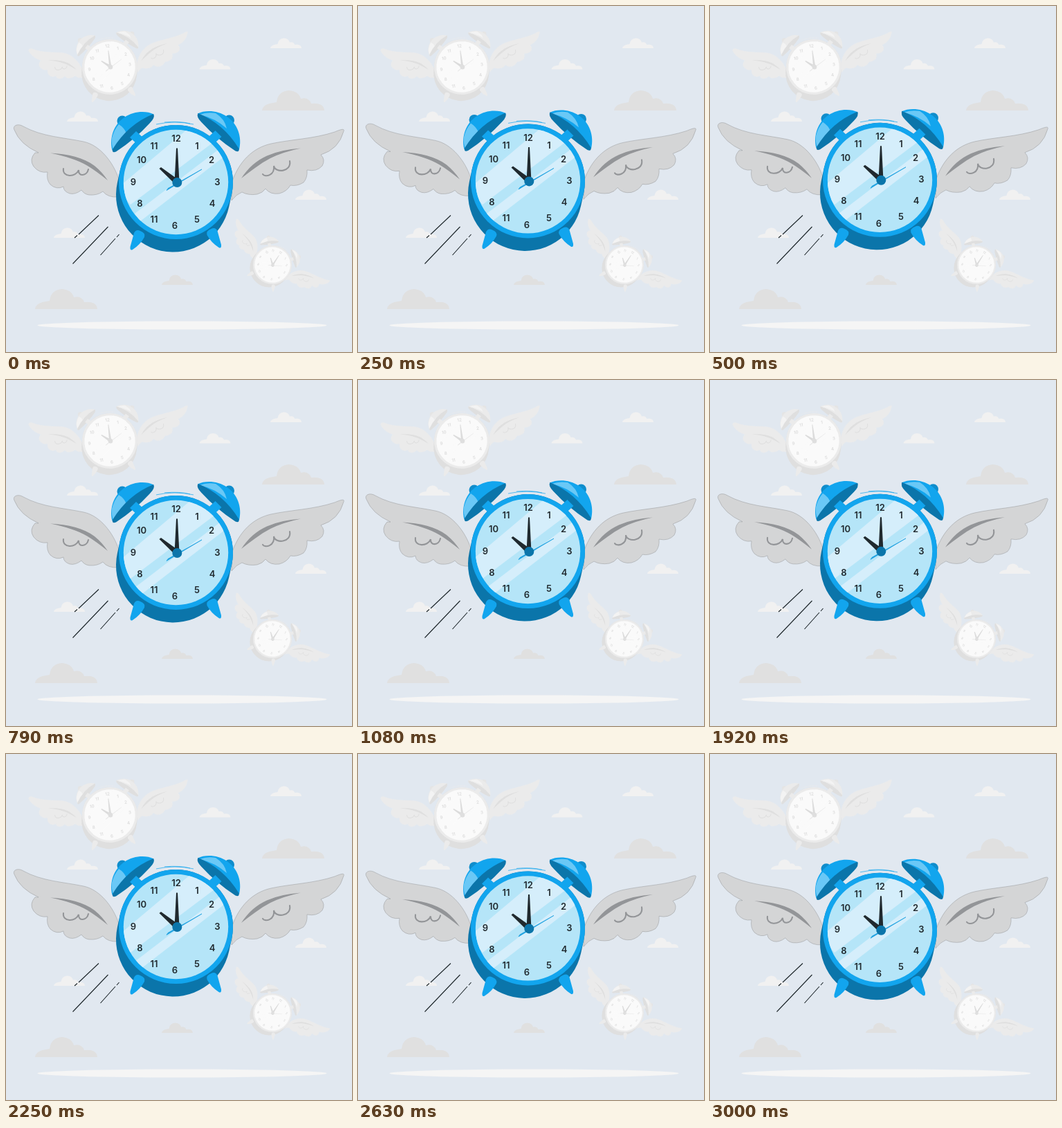
Recreate the animation shown at these times as an HTML page. Size 500x500 px, loop 3040 ms.

```html
<!DOCTYPE html>
<html lang="en">
<head>
<meta charset="utf-8">
<title>Flying alarm clock</title>
<style>
html, body { margin: 0; width: 100%; height: 100%; overflow: hidden; background: #e1e8f0; }
svg { display: block; width: 100%; height: 100%; }
.main {
  --rim: #12a5ee; --body: #0b75aa; --shine: #6ac8f6; --face: #b5e5f8; --glass: #d5eefb;
  --ink: #20292e; --sweep: #1a9fe0; --wing: #d4d5d6; --edge: #8e9092; --fold: #939598;
}
.pale {
  --rim: #ebebeb; --body: #dfdfdf; --shine: #f3f3f3; --face: #fafafa; --glass: #fafafa;
  --ink: #dcdcdc; --sweep: #e6e6e6; --wing: #ebebeb; --edge: #ebebeb; --fold: #dfdfdf;
}
.rim { fill: var(--rim); }
.body { fill: var(--body); }
.knob { fill: color-mix(in srgb, var(--rim), var(--body)); }
.shine { fill: var(--shine); }
.ink { fill: var(--ink); }
.wing { fill: var(--wing); stroke: var(--edge); stroke-width: .45; }
.fold { fill: var(--fold); }
.curl { fill: none; stroke: var(--fold); stroke-width: 2.1; stroke-linecap: round; }
#digits { fill: var(--ink); font: 600 13px Inter, "Open Sans", sans-serif; text-anchor: middle; }
.ground { fill: #f5f5f5; }
.light { fill: #f1f1f1; }
.dark { fill: #e0e0e0; }
</style>
</head>
<body>
<svg viewBox="0 0 500 500">
  <defs>
    <clipPath id="dial"><circle cx="245.500" cy="254.500" r="75.700"/></clipPath>
    <path id="cloud" d="M0 29Q1 20 16 18L21 17Q23 1 39 0Q53 1 56 12Q67 9 71 19Q89 17 90 29Z"/>
    <g id="dome">
      <circle class="knob" cx="168" cy="166" r="7.500"/>
      <path class="rim" d="M213.500 156.500C202 151 184 152 171 161C156 171 149 190 153.500 208.500L158 210L213 161Z"/>
    </g>
    <g id="mouth">
      <path class="body" d="M213 156Q216 161 208 169Q186 193 159 210.500Q153 213 154 207Q176 171 213 156Z"/>
      <path class="rim" d="M179 190L188 181L200 192L191 201Z"/>
    </g>
    <path id="foot" class="rim" d="M185 328Q188 322 194 325Q202 328 200 334Q194 345 183 352Q179 354 179.500 348Z"/>

    <g id="clock">
      <path class="wing" d="M12 179C9 173 17 169 25 174C52 189 84 190 112 196C136 201 155 226 163 250L162 276Q147 277 140 268Q132 274 120 273Q113 272 109 266Q100 273 92 271Q83 268 83 261Q73 266 64 258Q58 251 60 240Q48 242 40 232Q33 222 42 212H47Q20 200 12 179Z"/>
      <path class="fold" d="M64 212.500C90 214 112 219 128 231Q139 240 147 252Q131 239 118 231C104 223 87 217 64 212.500Z"/>
      <path class="curl" d="M83 235C81 248 101 248 105 237C104 247 117 246 119 236"/>
      <path class="wing" d="M488 181C490 176 482 179 475 182C445 192 410 193 383 199C356 205 337 225 327 253L326 281Q333 272 341 269Q350 274 363 272Q371 270 375 264Q382 273 395 271Q406 268 411 259Q420 261 430 255Q436 248 435 237Q449 240 457 231Q462 222 455 215Q481 207 488 181Z"/>
      <path class="fold" d="M340 249C350 234 362 223 377 216.500Q397 207.500 426 205.500Q400 211 382 220C367 228 354 238 340 249Z"/>
      <path class="curl" d="M410 224C413 240 389 242 387 231C389 245 374 248 371 243"/>

      <path d="M245.500 254.500L241.500 273" fill="none" stroke="var(--body)" stroke-width="165" stroke-linecap="round"/>
      <use href="#dome"/>
      <path class="shine" d="M153 191Q156 179 163 171Q171 176 174 184Q163 195 155 208Q152 199 153 191Z"/>
      <use href="#mouth"/>
      <g transform="translate(0 -1)">
        <use href="#dome" transform="matrix(-1 0 0 1 490.500 0)"/>
        <path class="shine" d="M280 158Q290 154 303 156Q316 164 319 178Q302 163 280 158Z"/>
        <use href="#mouth" transform="matrix(-1 0 0 1 490.500 0)"/>
      </g>
      <use href="#foot"/>
      <use href="#foot" transform="matrix(-1 0 0 1 490.500 -3)"/>
      <circle class="rim" cx="245.500" cy="254.500" r="82.500"/>
      <path d="M217 171Q244 165 271 171M229 168Q251 166 266 170" fill="none" stroke="var(--rim)" stroke-width=".7"/>
      <circle cx="245.500" cy="254.500" r="75.700" fill="var(--face)"/>
      <g clip-path="url(#dial)">
        <path id="glass" fill="var(--glass)" d="M160 264L280 163L322 180L180 287ZM186 300L322 196L330 206L194 311Z"/>
      </g>
      <g id="digits"></g>
      <path d="M232 266.500L283 236L234 263.500Z" fill="var(--sweep)" stroke="var(--sweep)" stroke-width=".7"/>
      <path class="ink" d="M246 205.500H248L250.500 255H243.500ZM221.500 235L224 233L249 251L244 257Z"/>
      <circle class="body" cx="247.300" cy="255" r="7"/>
    </g>
  </defs>

  <ellipse class="ground" cx="254.500" cy="461.500" rx="209" ry="6"/>
  <g id="sky"></g>
  <g class="pale">
    <use href="#clock" transform="translate(150 88) rotate(-7) scale(.485) translate(-245.500 -254.500)"/>
    <use href="#clock" transform="translate(385 374) rotate(33) scale(.34) translate(-245.500 -254.500)"/>
  </g>
  <path d="M134 302.500L105 330M103 331.500L99 335M147.500 319L96.500 372.500M163.500 330L160 334M158 336L136.500 360" stroke="#1c2529" stroke-width="1.100"/>
  <g id="flyer" class="main"><use href="#clock"/></g>
</svg>
<script>
const byId = id => document.getElementById(id);

// x, y, scale, tone
const clouds = [
  [382, 46.5, .5, 'light'], [279.5, 77, .5, 'light'], [88, 152.5, .5, 'light'],
  [418, 265.5, .5, 'light'], [69, 320.5, .5, 'light'],
  [370, 122, 1, 'dark'], [42, 409, 1, 'dark'], [225, 388.5, .5, 'dark']
];
byId('sky').innerHTML = clouds.map(([x, y, s, tone]) =>
  `<use href="#cloud" class="${tone}" transform="translate(${x} ${y}) scale(${s})"/>`).join('');

// label, centre x, centre y
const digits = [
  [12, 246, 191.5], [1, 276, 202.5], [2, 297, 222.5], [3, 305.5, 254], [4, 298, 285], [5, 276, 308],
  [6, 244, 317.5], [11, 214, 308], [8, 193.5, 285], [9, 184, 254], [10, 196, 222.5], [11, 214, 202.5]
];
byId('digits').innerHTML = digits.map(([label, x, y]) =>
  `<text x="${x}" y="${y + 4.7}">${label}</text>`).join('');

const LOOP = 3040, RISE = 9.7;
const shift = (id, y) => byId(id).setAttribute('transform', `translate(0 ${y})`);
function draw() {
  const p = performance.now() % LOOP / LOOP;
  const lift = RISE * (1 - Math.abs(1 - 2 * p));
  shift('flyer', -lift);
  shift('glass', lift); // reflections stay put while the dial moves
  requestAnimationFrame(draw);
}
draw();
</script>
</body>
</html>
```
